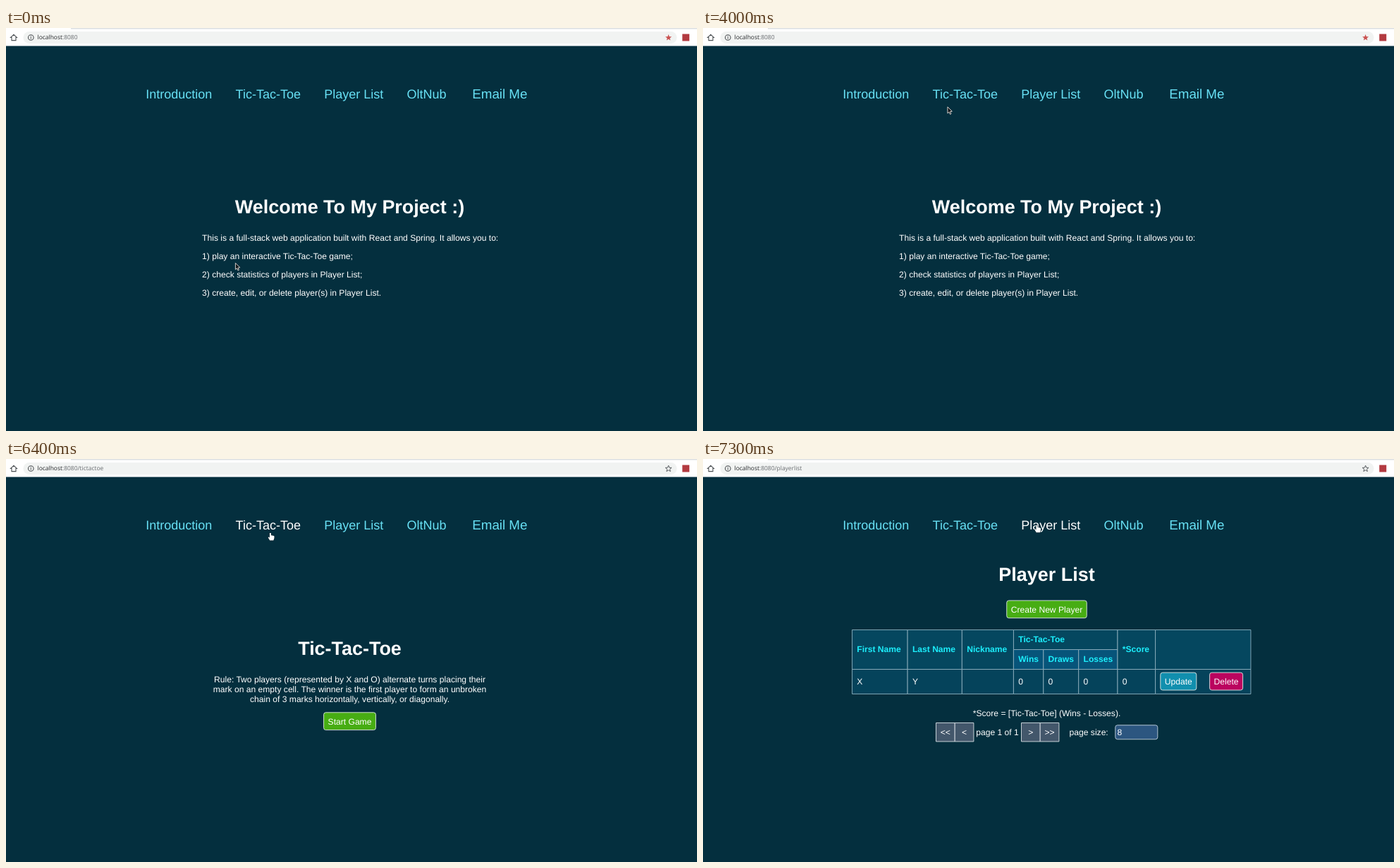
Recreate the animation shown at these times as an HTML page with a canvas. Size 980x572 px, loop 8 s.

```html
<!DOCTYPE html>
<html lang="en">
<head>
<meta charset="utf-8">
<title>Tic-Tac-Toe project</title>
<style>
html, body { margin: 0; width: 100%; height: 100%; overflow: hidden; background: #042f3e; }
canvas { display: block; }
</style>
</head>
<body>
<canvas id="stage" width="980" height="572"></canvas>
<script>
const ctx = document.getElementById('stage').getContext('2d');
const LOOP = 8000, STEP = 100, MID = 487.5, BODY = 12.1, PAD = 6.8;
const SANS = '"Liberation Sans", Arial, sans-serif';
const UI = '"Open Sans", "Noto Sans", sans-serif';
const BG = '#042f3e', LINK = '#68e1f5', HEAD = '#1ceefc', EDGE = '#8fb0bf', GREEN = '#47ad13';

// Pointer moves; sag bends the path downwards
const START = { x: 325, y: 333 };
const MOVES = [
  { from: 1000, to: 1300, x: 325.5, y: 190.5 },
  { from: 1400, to: 1800, x: 359.5, y: 141.5 },
  { from: 2100, to: 2300, x: 319.5, y: 112.5 },
  { from: 2400, to: 2500, x: 311.5, y: 107 },
  { from: 2600, to: 2800, x: 282.5, y: 95.5 },
  { from: 3500, to: 4000, x: 346.5, y: 111.3, sag: 15 },
  { from: 4000, to: 4400, x: 357.5, y: 98 },
  { from: 4500, to: 4600, x: 358.5, y: 94.5 },
  { from: 6300, to: 7000, x: 473.5, y: 93.5, sag: 24 }
];

function setFont(size, bold = false, font = SANS) {
  ctx.font = `${bold ? 'bold ' : ''}${size}px ${font}`;
  ctx.textRendering = 'geometricPrecision';
}

function widthOf(str, size = BODY, bold = false, font = SANS) {
  setFont(size, bold, font);
  return ctx.measureText(str).width;
}

function text(str, x, y, { size = BODY, color = '#fff', align = 'left', bold = false, font = SANS } = {}) {
  setFont(size, bold, font);
  ctx.textAlign = align;
  ctx.fillStyle = color;
  ctx.fillText(str, x, y);
}

function box(x, y, w, h, fill, stroke, r = 0) {
  ctx.beginPath();
  ctx.roundRect(x, y, w, h, r);
  ctx.fillStyle = fill;
  ctx.fill();
  if (!stroke) return;
  ctx.strokeStyle = stroke;
  ctx.lineWidth = 0.9;
  ctx.stroke();
}

function poly(points, dx, dy) {
  ctx.beginPath();
  for (const [x, y] of points) ctx.lineTo(x + dx, y + dy);
  ctx.closePath();
}

const buttonWidth = label => widthOf(label) + 12;

function button(label, x, y, fill) {
  const w = buttonWidth(label);
  box(x, y, w, 24.8, fill, '#dfe9e6', 3);
  text(label, x + w / 2, y + 16.7, { align: 'center' });
}

const midButton = (label, y) => button(label, MID - buttonWidth(label) / 2, y, GREEN);
const title = (str, y) => text(str, MID, y, { size: 26.95, bold: true, align: 'center' });

function layoutNav() {
  let x = 198.2;
  return ['Introduction', 'Tic-Tac-Toe', 'Player List', 'OltNub', 'Email Me'].map(label => {
    const mail = label === 'Email Me';
    const size = mail ? 18.75 : 18;
    if (mail) x += 3.4;
    const link = { label, size, x, end: x + widthOf(label, size) };
    x = link.end + 33.3;
    return link;
  });
}
const NAV = layoutNav();

function drawStar(cx, cy, filled) {
  const pts = Array.from({ length: 10 }, (_, i) => {
    const a = (i / 5 - 0.5) * Math.PI, r = i % 2 ? 2 : 4.7;
    return [Math.cos(a) * r, Math.sin(a) * r];
  });
  poly(pts, cx, cy);
  if (filled) {
    ctx.fillStyle = '#c9504f';
    ctx.fill();
  } else {
    ctx.strokeStyle = '#5a5e62';
    ctx.lineWidth = 1;
    ctx.stroke();
  }
}

function drawBar(path, starred) {
  box(0, 0, 980, 25.5, '#fff');
  box(92, 0, 888, 1.6, '#dcdfe1');
  box(24.5, 5, 927, 17, '#f1f3f2', null, 8.5);

  ctx.strokeStyle = '#4c5054';
  ctx.lineWidth = 1.1;
  poly([[0, -4.3], [4.4, -0.2], [3, -0.2], [3, 4], [-3, 4], [-3, -0.2], [-4.4, -0.2]], 11, 13.6);
  ctx.stroke();

  ctx.beginPath();
  ctx.arc(35.3, 13.5, 3.8, 0, Math.PI * 2);
  ctx.stroke();
  box(34.8, 12.8, 1, 2.8, '#4c5054');
  box(34.8, 11.2, 1, 1, '#4c5054');

  const host = 'localhost', url = { size: 8.45, font: UI };
  text(host, 44.6, 16.4, { ...url, color: '#25282b' });
  text(':8080' + path, 44.6 + widthOf(host, url.size, false, UI), 16.4, { ...url, color: '#686c70' });

  drawStar(939.6, 13.8, starred);
  box(959.2, 8.5, 10, 10, '#b23a40');
}

function drawNav(hover) {
  for (const link of NAV) {
    text(link.label, link.x, 99.6, { size: link.size, color: link === hover ? '#fff' : LINK });
  }
}

function drawHome() {
  title('Welcome To My Project :)', 262.6);
  [
    'This is a full-stack web application built with React and Spring. It allows you to:',
    '1) play an interactive Tic-Tac-Toe game;',
    '2) check statistics of players in Player List;',
    '3) create, edit, or delete player(s) in Player List.'
  ].forEach((line, i) => text(line, 278.1, 302.3 + i * 26.04));
}

function drawRules() {
  title('Tic-Tac-Toe', 278);
  [
    'Rule: Two players (represented by X and O) alternate turns placing their',
    'mark on an empty cell. The winner is the first player to form an unbroken',
    'chain of 3 marks horizontally, vertically, or diagonally.'
  ].forEach((line, i) => text(line, MID, 317.2 + i * 14, { align: 'center' }));
  midButton('Start Game', 359.8);
}

function drawTable(loaded) {
  const top = 242.5, mid = 270.5, low = 298.5, end = 333.5;
  const labels = ['First Name', 'Last Name', 'Nickname', 'Wins', 'Draws', 'Losses', '*Score', ''];
  const values = ['X', 'Y', '', '0', '0', '0', '0', ''];
  const inGroup = i => i > 2 && i < 6;
  const stretch = loaded ? 1.033 : 1.046;

  // Columns fit their labels; the last one fits the row's buttons
  const widths = labels.map((s, i) => {
    if (!s) return loaded ? 135.3 : 14.8;
    return (widthOf(s, BODY, true) + 2 * PAD) * (inGroup(i) ? 1 : stretch);
  });
  const edges = [494.2 - widths.reduce((a, b) => a + b) / 2];
  widths.forEach((w, i) => edges.push(edges[i] + w));

  const cell = (i, j, y1, y2, fill) => box(edges[i], y1, edges[j] - edges[i], y2 - y1, fill, EDGE);
  const head = (s, i, y) => text(s, edges[i] + PAD, y, { bold: true, color: HEAD });

  cell(3, 6, top, mid, '#05475f');
  head('Tic-Tac-Toe', 3, 260.2);
  labels.forEach((s, i) => {
    const sub = inGroup(i);
    cell(i, i + 1, sub ? mid : top, low, sub ? '#07547a' : '#05475f');
    head(s, i, sub ? 288.3 : 274.3);
    if (!loaded) return;
    cell(i, i + 1, low, end, '#05435b');
    text(values[i], edges[i] + PAD, 319.9);
  });
  if (!loaded) return;
  const x = edges[7] + 7.2;
  button('Update', x, 303.2, '#118fae');
  button('Delete', x + buttonWidth('Update') + 18.8, 303.2, '#bb045f');
}

function drawList(loaded) {
  title('Player List', 173.2);
  midButton('Create New Player', 200.9);
  drawTable(loaded);

  const dy = loaded ? 35 : 0, base = 357 + dy, bw = 26.7;
  text('*Score = [Tic-Tac-Toe] (Wins - Losses).', MID, 329.7 + dy, { align: 'center' });
  ['<<', '<', '>', '>>'].forEach((s, i) => {
    const x = 330.5 + i * bw + (i > 1 ? 67.6 : 0);
    box(x, 339.5 + dy, bw, 26.5, '#43576b', '#d9e0e5');
    text(s, x + bw / 2, base, { align: 'center' });
  });
  text('page 1 of ' + (loaded ? 1 : 0), 387.2, base);
  text('page size:', 519.6, base);
  box(584.8, 342.8 + dy, 60, 20, '#2c5680', '#c3d2de', 3);
  text('8', 587.4, base);
}

function pointerAt(t) {
  let { x, y } = START;
  for (const m of MOVES) {
    if (t <= m.from) break;
    const k = Math.min(1, (t - m.from) / (m.to - m.from));
    x += (m.x - x) * k;
    y += (m.y - y) * k + (m.sag || 0) * Math.sin(Math.PI * k);
  }
  return { x, y };
}

function drawArrow({ x, y }) {
  poly([[0.4, 0.6], [0.4, 9.8], [2.4, 8], [4, 11.2], [5.4, 10.5], [4, 7.4], [6.8, 7]], x, y);
  ctx.fillStyle = '#14191d';
  ctx.fill();
  ctx.strokeStyle = '#e6dfda';
  ctx.lineWidth = 0.9;
  ctx.stroke();
}

function drawHand({ x, y }) {
  poly([
    [-1, 0.2], [0.8, 0.2], [1, 3.6], [4.8, 4.2], [5.6, 5], [5.4, 8], [4.4, 10.8],
    [-0.8, 10.8], [-3.2, 6.8], [-2.6, 5.8], [-1, 7]
  ], x, y);
  ctx.strokeStyle = '#10242d';
  ctx.lineWidth = 1;
  ctx.stroke();
  ctx.fillStyle = '#fff';
  ctx.fill();
}

function draw(t) {
  const p = pointerAt(t);
  const hover = p.y < 107.5 && NAV.find(l => p.x > l.x - 20 && p.x < l.end + 20);

  ctx.fillStyle = BG;
  ctx.fillRect(0, 0, 980, 572);
  drawBar(t < 4600 ? '' : t < 7200 ? '/tictactoe' : '/playerlist', t < 4700);
  drawNav(hover);
  if (t < 5000) drawHome();
  else if (t < 7200) drawRules();
  else drawList(t >= 7300);
  (hover ? drawHand : drawArrow)(p);
}

const start = performance.now();
function tick() {
  const t = (performance.now() - start) % LOOP;
  draw(Math.floor(t / STEP) * STEP);
  requestAnimationFrame(tick);
}
tick();
</script>
</body>
</html>
```
